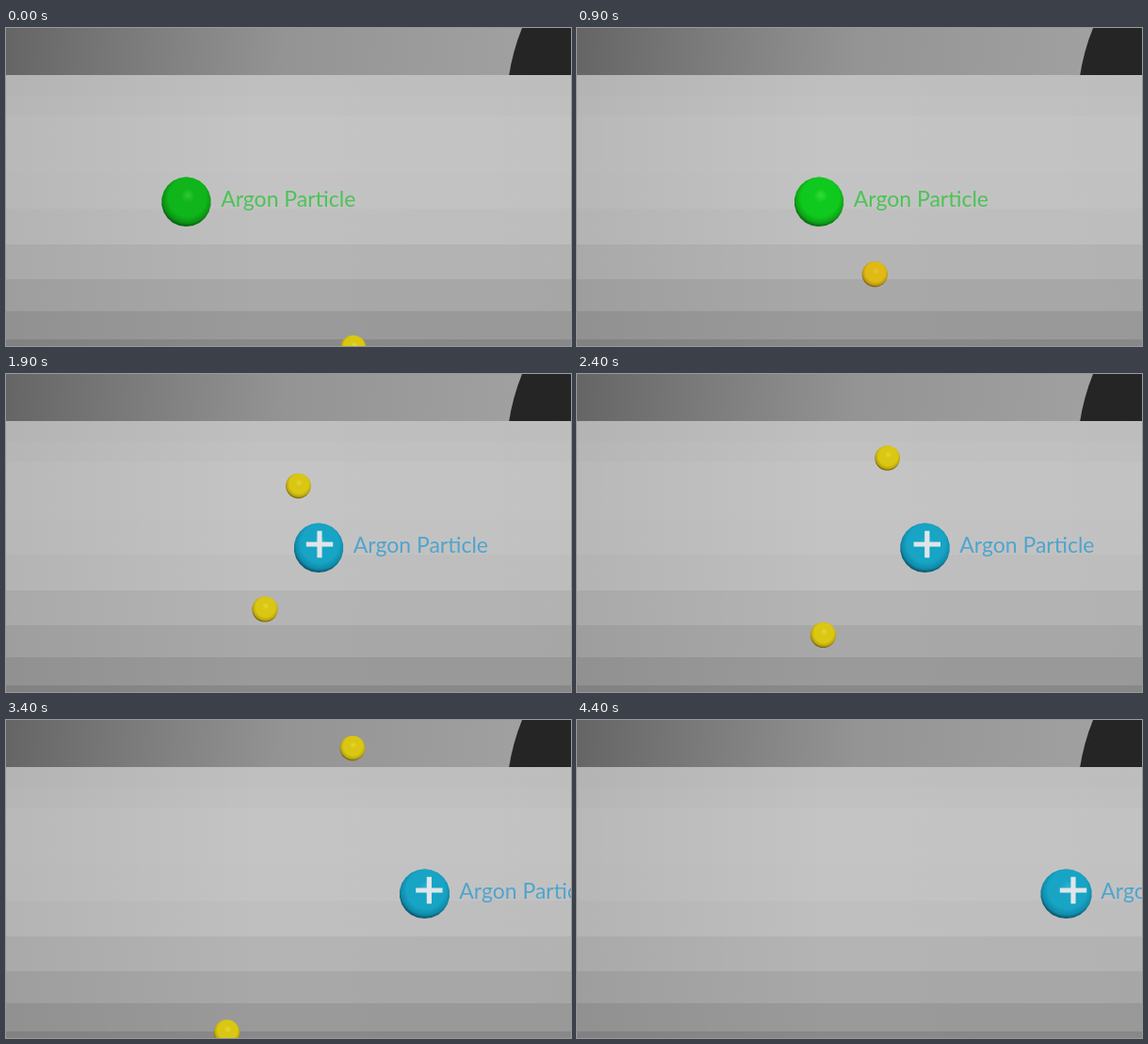
An HTML page for the animation above (4500 ms loop, 600 by 338 pixels).

```html
<!DOCTYPE html>
<html lang="en">
<head>
<meta charset="utf-8">
<title>Argon Particle</title>
<style>
  html, body { margin: 0; width: 100%; height: 100%; overflow: hidden; background: #bbb; }
  svg { display: block; width: 100%; height: 100%; }
  text { font: 23px Lato, "Open Sans", sans-serif; }
</style>
</head>
<body>
<svg id="stage" viewBox="0 0 600 338">
  <defs>
    <linearGradient id="wall" gradientUnits="userSpaceOnUse" x1="0" y1="0" x2="540" y2="40">
      <stop offset="0" stop-color="#656565"/>
      <stop offset=".25" stop-color="#7b7b7b"/>
      <stop offset=".55" stop-color="#949494"/>
      <stop offset="1" stop-color="#a0a0a0"/>
    </linearGradient>
    <linearGradient id="sides">
      <stop offset="0" stop-color="#000" stop-opacity=".06"/>
      <stop offset=".45" stop-color="#000" stop-opacity="0"/>
      <stop offset="1" stop-color="#000" stop-opacity=".01"/>
    </linearGradient>
  </defs>
  <rect width="600" height="51" fill="url(#wall)"/>
  <path d="M548 0Q538 25 534 51H600V0Z" fill="#262526"/>
  <g id="bands"></g>
  <rect y="50" width="600" height="288" fill="url(#sides)"/>
  <g id="scene"></g>
</svg>
<script>
const LOOP = 4500, STEP = 100, TICKS_PER_STEP = 2.4, HIT = 32;
const ARGON_Y = 184.7;

function add(parent, tag, attrs) {
  const node = document.createElementNS("http://www.w3.org/2000/svg", tag);
  for (const key in attrs) node.setAttribute(key, attrs[key]);
  return parent.appendChild(node);
}

const stage = document.getElementById("stage");
const scene = document.getElementById("scene");
const defs = stage.querySelector("defs");

// Floor: horizontal bands, each starting at y and running to the bottom
const bands = [
  [50, "#c0bfc0"], [72, "#c2c1c2"], [93, "#c5c4c5"], [154, "#c4c3c4"], [192, "#c0bfc0"],
  [230, "#b5b4b5"], [267, "#a9a8a9"], [301, "#9b9a9b"], [331, "#8a898a"]
];
for (const [y, fill] of bands)
  add(document.getElementById("bands"), "rect", { y, width: 600, height: 338 - y, fill });

function shade(id, light, base, low, rim) {
  const gradient = add(defs, "radialGradient", { id, cx: .52, cy: .44, r: .57, fx: .54, fy: .36 });
  [[0, light], [.25, base], [.68, base], [.87, low], [1, rim]].forEach(([offset, color]) =>
    add(gradient, "stop", { offset, "stop-color": color }));
}
shade("green", "#32d83c", "#10c51d", "#0ca016", "#08560c");
shade("blue", "#2bb3d2", "#17a4c5", "#108baa", "#0a4558");
shade("yellow", "#e6d636", "#dac713", "#b9a40e", "#5f5309");
shade("amber", "#e8c53a", "#dfba14", "#bd9a0e", "#644f09");

function ball(color, sides) {
  const points = Array.from({ length: sides }, (_, k) => {
    const a = 2 * Math.PI * (k + .5) / sides;
    return Math.cos(a).toFixed(3) + "," + Math.sin(a).toFixed(3);
  }).join(" ");
  return add(scene, "polygon", { points, fill: `url(#${color})` });
}

function place(node, x, y, rx, ry = rx) {
  node.setAttribute("transform", `translate(${x} ${y}) scale(${rx} ${ry})`);
}

function show(node, visible) {
  node.setAttribute("visibility", visible ? "visible" : "hidden");
}

const electron = ball("amber", 24);
const freed = ball("yellow", 24);
const atom = ball("green", 22);
const plus = add(scene, "path", { d: "M-14.2 0H14.2M0 -14.2V14.2", stroke: "#e0e5e8", "stroke-width": 5.2 });
const label = add(scene, "text", { y: 190 });
label.textContent = "Argon Particle";

function draw(time) {
  const step = Math.floor((time % LOOP) / STEP);
  const n = Math.floor(step * TICKS_PER_STEP + .3);
  const ionized = n >= HIT;
  const after = n - HIT;

  const x = 191.4 + 3.125 * n;
  const spread = Math.max(0, (x - 300) / 220);
  place(atom, x, ARGON_Y, 26.3 + spread ** 2, 26.4);
  atom.setAttribute("fill", ionized ? "url(#blue)" : "url(#green)");
  atom.style.filter = ionized ? "none" : `brightness(${.92 + .1 * Math.min(1, n / 21)})`;

  label.setAttribute("x", x + 36.8);
  label.setAttribute("fill", ionized ? "#4fa5cc" : "#4bc454");

  show(plus, ionized);
  plus.setAttribute("transform", `translate(${333 + 3.233 * (n - 45)} 181)`);

  if (ionized) place(electron, 289.6 - 1.125 * after, 220.4 + 2.28 * after, 13.7);
  else place(electron, 368.8 - 2.5 * n, 340.2 - 3.74 * n, 13.7);
  electron.setAttribute("fill", ionized || n < 7 ? "url(#yellow)" : "url(#amber)");

  show(freed, ionized);
  place(freed, 289.7 + 1.597 * after, 151.1 - 2.472 * after, 13.4);
}

const start = performance.now();
function tick() {
  draw(performance.now() - start);
  requestAnimationFrame(tick);
}
tick();
</script>
</body>
</html>
```
